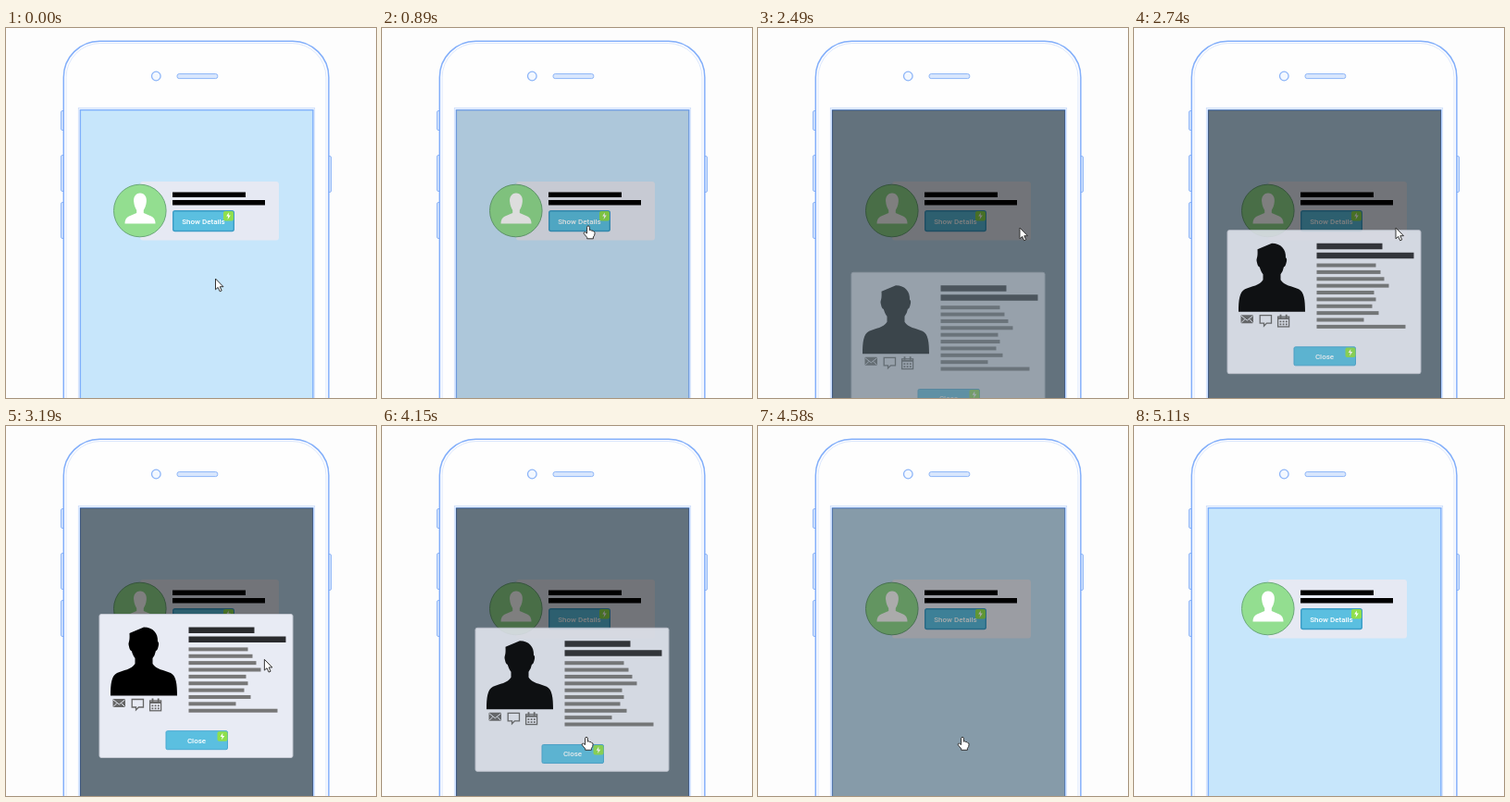
An HTML page for the animation above (5540 ms loop, 400 by 400 pixels).

```html
<!DOCTYPE html>
<html lang="en">
<head>
<meta charset="utf-8">
<title>Contact card popup</title>
<style>
  html, body { margin: 0; width: 100%; height: 100%; overflow: hidden; background: #fdfdfd; }
  svg { display: block; width: 100%; height: 100%; }
  text { font: 500 8px Roboto, Arial, sans-serif; fill: #fff; text-anchor: middle; }
</style>
</head>
<body>
<svg viewBox="0 0 400 400">
  <defs>
    <g id="badge">
      <rect width="11" height="10.5" rx="2" fill="#8fdf4d"/>
      <path d="M5.8 1.5 3.2 5.6H5.2L4.6 9 7.8 4.6H5.7Z" fill="#fff"/>
    </g>
  </defs>

  <!-- Phone -->
  <g fill="#d9e7fd" stroke="#8db5f8">
    <rect x="59.5" y="89.5" width="5" height="21" rx="1.5"/>
    <rect x="59.5" y="137.5" width="5" height="39" rx="1.5"/>
    <rect x="59.5" y="188.5" width="5" height="39" rx="1.5"/>
    <rect x="346.5" y="138.5" width="5" height="39" rx="1.5"/>
    <rect x="62.3" y="14.2" width="286.6" height="440" rx="39" fill="#fdfdff" stroke="#83affa" stroke-width="1.5"/>
    <rect x="65" y="16.5" width="281" height="440" rx="37" fill="#fefefe" stroke="#d5e3fb" stroke-width=".8"/>
    <circle cx="162.3" cy="52" r="4.8" fill="#f3f8ff" stroke-width="1.3"/>
    <rect x="185" y="49.6" width="43.8" height="5" rx="2.2"/>
    <rect x="78.3" y="86.5" width="255.4" height="340" fill="#fff" stroke="#c8dafa" stroke-width=".8"/>
    <rect x="80.3" y="88.6" width="251.6" height="340" fill="#c7e6fb" stroke="#7fb0fb" stroke-width="1.5"/>
  </g>

  <!-- Contact card -->
  <rect x="145" y="166" width="150" height="63.5" rx="3" fill="#e6e9f3"/>
  <circle cx="144.8" cy="197.5" r="28.3" fill="#93de90" stroke="#6ba878"/>
  <path fill="#fff" d="M145 178.500C150 178.500 152.500 183 151.800 188 151.500 192 150 195 148.800 197V200L157 203.500Q161.500 205.500 161.500 211.500H128.500Q128.500 205.500 133 203.500L141.200 200V197C140 195 138.500 192 138.200 188 137.500 183 140 178.500 145 178.500Z"/>
  <path d="M180 177.500h79v5.500h-79zM180 186h100v5.500h-100z"/>
  <rect x="180.700" y="197.700" width="65.600" height="21.800" rx="2" fill="#5bbfe0" stroke="#3b9cc6" stroke-width="1.4"/>
  <text x="213.500" y="211.800">Show Details</text>
  <use href="#badge" x="235" y="198"/>

  <rect id="shade" x="80" y="88.500" width="252" height="312"/>

  <!-- Details popup -->
  <g id="popup">
    <rect x="101" y="203.500" width="209" height="155" rx="2" fill="#e8ebf4" stroke="#c6cad4"/>
    <path d="M149 217.500C159 217.500 164.500 224 164 233Q166 234 164.500 239 163.500 243 162 243 161 248 158.500 251V257C162 263 171 264 178 267 184 270 185 279 185 291.500H113C113 279 114 270 120 267 127 264 136 263 139.500 257V251C137 248 136 243 135.500 243 134 243 133 239 132.500 236 132.500 233 134 233 133.500 224 139 217.500 149 217.500Z"/>
    <g id="lines" fill="#777"></g>
    <path fill="#2a2b2e" d="M197.500 217.500h71v6.500h-71zM197.500 227.500h105v6.500h-105z"/>
    <g fill="none" stroke="#666" stroke-width="1.300">
      <rect x="115.500" y="295" width="13.500" height="9" rx="1" fill="#666" stroke="none"/>
      <path d="M116 296 122.300 301 128.500 296M116 303.500 120 299.500M128.500 303.500 124.500 299.500" stroke="#e8ebf4" stroke-width="1"/>
      <path d="M136.200 295.500H148.500V304H143.500L140.500 307V304H136.200Z"/>
      <rect x="155.600" y="297" width="12" height="10.800"/>
      <path d="M155.600 299H167.600M158.500 294.500V298M164.700 294.500V298" stroke-width="1.800"/>
      <path d="M157.500 302.300H166M157.500 305.300H166" stroke-dasharray="1.800 1.400" stroke-width="1.800"/>
    </g>
    <rect x="173" y="329.700" width="66.500" height="20" rx="1.500" fill="#5bbfe0" stroke="#4aa9d2"/>
    <text x="206" y="342.500">Close</text>
    <use href="#badge" x="228.500" y="330.300"/>
  </g>

  <g id="cursor" fill="#fff" stroke="#333" stroke-linejoin="round">
    <path id="arrow" d="M.5 .5V12.300L3.200 9.900 5.200 14.300 7.200 13.400 5.300 9.200H9Z"/>
    <path id="hand" d="M-1.400 8.500V1.800Q-1.400 .4 0 .4T1.400 1.800V5.200Q2.800 4.300 3.800 5.700 5.200 5.100 5.800 6.600 7.200 6.500 7.100 8.200 7 11 5.400 12.500V14.300H-1.300V12.900L-4.700 8.900Q-5.200 7.200-3.600 7.100Z"/>
  </g>
</svg>
<script>
const $ = id => document.getElementById(id);
const LOOP = 5540;
const ramp = (t, a, b) => Math.min(1, Math.max(0, (t - a) / (b - a)));
const smooth = u => u * u * (3 - 2 * u);

$("lines").innerHTML = [64, 69, 73, 78, 62, 64, 60, 67, 51, 96]
  .map((w, i) => `<rect x="197.500" y="${239.4 + i * 7.37}" width="${w}" height="4"/>`).join("");

// Each move: start, end, from, control point, to
const moves = [
  [220, 700, [226, 270.5], [225, 243], [223, 213.5]],
  [1860, 2450, [223, 213.5], [252, 212], [282.5, 215.5]],
  [3000, 3600, [282.5, 215.5], [286, 280], [221, 336]],
  [4690, 5110, [221, 336], [310, 330], [404, 322]]
];

function cursorAt(t) {
  const [start, end, a, c, b] = moves.findLast(m => t >= m[0]) || moves[0];
  const u = smooth(ramp(t, start, end)) * .4 + ramp(t, start, end) * .6;
  return a.map((v, i) => (1 - u) ** 2 * v + 2 * u * (1 - u) * c[i] + u * u * b[i]);
}

function draw(now) {
  const t = now % LOOP;
  $("shade").setAttribute("opacity", .5 * (ramp(t, 840, 1030) - ramp(t, 4530, 4680)));

  const shown = t < 3500
    ? 1 - (1 - ramp(t, 2350, 2990)) ** 2
    : (1 - ramp(t, 4105, 4530)) ** 1.4;
  $("popup").setAttribute("opacity", shown);
  $("popup").setAttribute("transform", `translate(0 ${100 * (1 - shown)})`);

  const pointing = t >= 700 && t < 1610 || t >= 3660 && t < 4730;
  $("arrow").style.display = pointing ? "none" : "";
  $("hand").style.display = pointing ? "" : "none";
  $("cursor").style.display = t < 5110 ? "" : "none";
  $("cursor").setAttribute("transform", `translate(${cursorAt(t)})`);
}

const begin = performance.now();
function tick() {
  draw(performance.now() - begin);
  requestAnimationFrame(tick);
}
tick();
</script>
</body>
</html>
```
